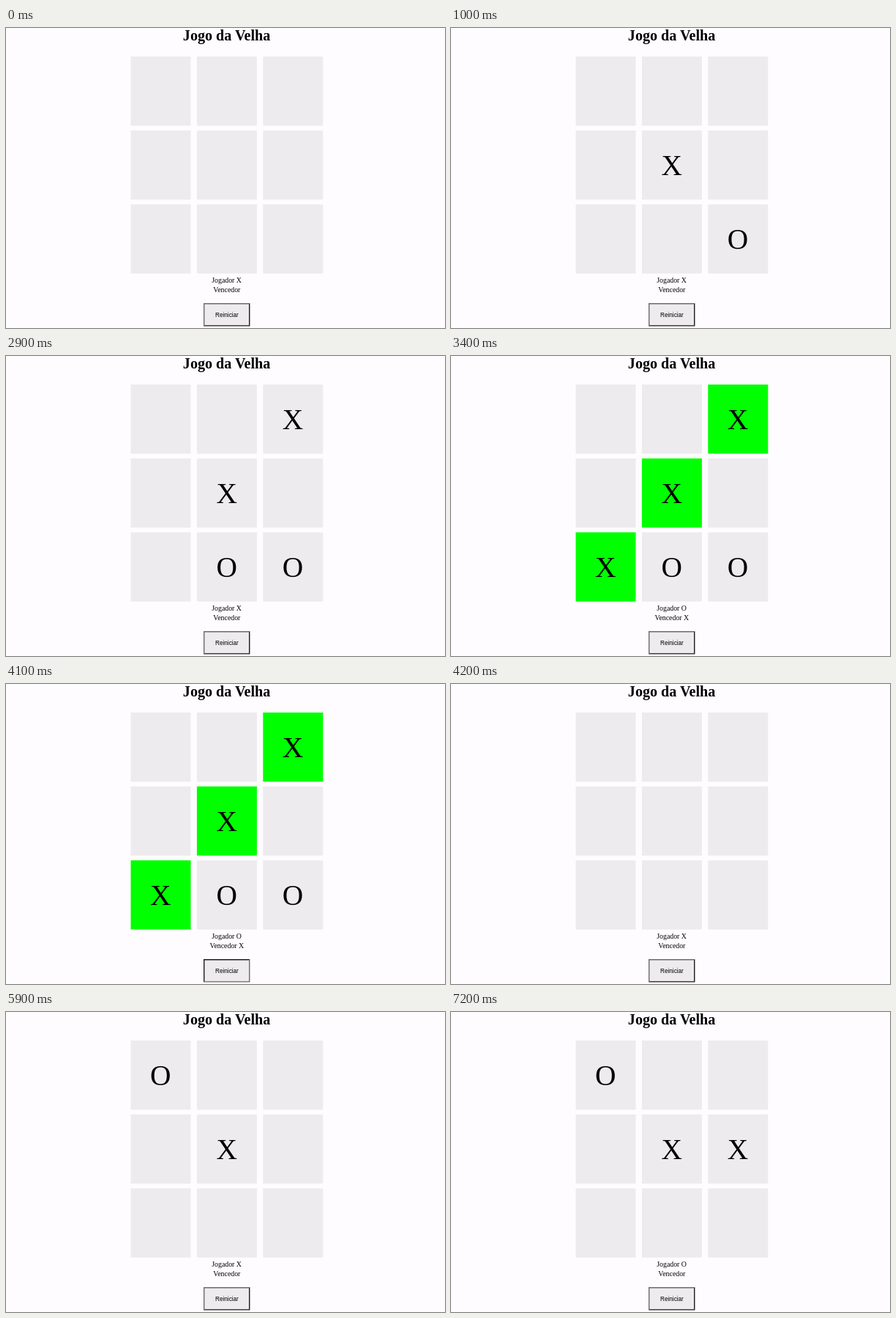
Write an HTML page that moves like this. It is 600 by 410 pixels and loops after 8000 ms.

```html
<!DOCTYPE html>
<html lang="pt">
<head>
<meta charset="utf-8">
<title>Jogo da Velha</title>
<style>
  html, body { margin: 0; width: 100%; height: 100%; overflow: hidden; background: #fefcfe; }
  svg { display: block; }
  text { font-family: "Liberation Serif", "Times New Roman", serif; font-size: 9.85px; text-anchor: middle; }
  .title { font-size: 20.1px; font-weight: bold; }
  .mark { font-size: 39.4px; }
  .label { font-family: "Liberation Sans", Arial, sans-serif; font-size: 8.2px; }
</style>
</head>
<body>
<svg width="600" height="410" viewBox="0 0 600 410">
  <text class="title" x="301.6" y="17">Jogo da Velha</text>
  <g id="board"></g>
  <text id="player" x="301.6" y="348"></text>
  <text id="winner" x="301.8" y="360.5"></text>
  <rect x="270" y="376" width="63.4" height="31.6" fill="#edebee"/>
  <path id="topLeft" d="M270 407.6V376H333.4L332 377.4H271.4V406.2Z"/>
  <path id="bottomRight" d="M270 407.6H333.4V376L332 377.4V406.2H271.4Z"/>
  <text class="label" x="301.9" y="395">Reiniciar</text>
</svg>
<script>
const LOOP = 8000, CELL = '#edebee', WIN = '#00ff00';
const LIGHT = '#6b6b6b', DARK = '#1c1c1c';
const PRESS = 4000, RESET = 4200;
// Each move is [time, cell]; cells count from the top left, X always starts.
const games = [
  { start: 0, moves: [[400, 4], [1000, 8], [1800, 2], [2900, 7], [3400, 6]] },
  { start: RESET, moves: [[5100, 4], [5900, 0], [7200, 5]] }
];
const lines = ['012', '345', '678', '036', '147', '258', '048', '246']
  .map(line => [...line].map(Number));

const $ = id => document.getElementById(id);

function add(tag, attributes) {
  const node = document.createElementNS('http://www.w3.org/2000/svg', tag);
  for (const name in attributes) node.setAttribute(name, attributes[name]);
  return $('board').appendChild(node);
}

const cells = Array.from({ length: 9 }, (_, i) => {
  const x = 170.5 + 90.4 * (i % 3), y = 39 + 101 * Math.floor(i / 3);
  return {
    box: add('rect', { x, y, width: 82, height: 94.5 }),
    mark: add('text', { class: 'mark', x: x + 40.8, y: y + 60.6 })
  };
});

function render(t) {
  const game = games.findLast(g => t >= g.start);
  const played = game.moves.filter(([time]) => t >= time);
  const marks = Array(9).fill('');
  played.forEach(([, cell], turn) => marks[cell] = 'XO'[turn % 2]);
  const won = lines.find(([a, b, c]) => marks[a] && marks[a] === marks[b] && marks[a] === marks[c]);

  cells.forEach(({ box, mark }, i) => {
    box.setAttribute('fill', won && won.includes(i) ? WIN : CELL);
    mark.textContent = marks[i];
  });
  $('player').textContent = 'Jogador ' + 'XO'[played.length % 2];
  $('winner').textContent = won ? 'Vencedor ' + marks[won[0]] : 'Vencedor';

  const pressed = t >= PRESS && t < RESET;
  $('topLeft').setAttribute('fill', pressed ? DARK : LIGHT);
  $('bottomRight').setAttribute('fill', pressed ? LIGHT : DARK);
}

const begin = performance.now();
function tick() {
  render((performance.now() - begin) % LOOP);
  requestAnimationFrame(tick);
}
tick();
</script>
</body>
</html>
```
